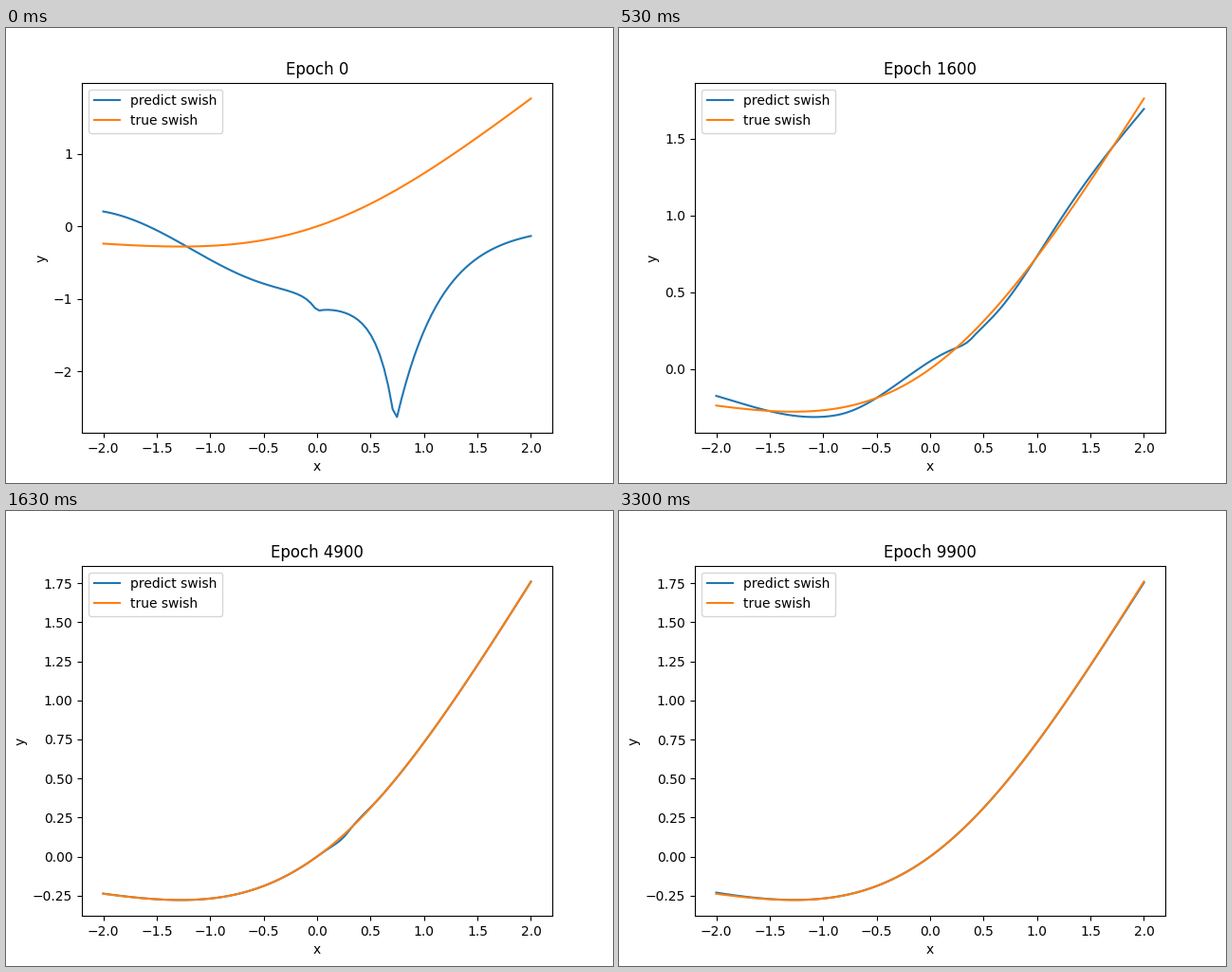
These frames come from a looping animation (640 px wide and 480 px high, 3.33 s). A matplotlib script:

```python
import numpy as np
import matplotlib.pyplot as plt
from matplotlib.animation import FuncAnimation

TICK_MS = 30
LOOP_MS = 3330
EPOCHS_PER_STEP = 100
WARMUP = 1000

# Crests of the error wave that is left after the warm-up.
CREST_X = np.array([-2.5, -.9, -.06, .58, 1.35, 2.6])
CREST_Y = np.array([.22, -.103, .122, -.1, .088, -.38])

x = np.linspace(-2, 2, 100)
true = x / (1 + np.exp(-x))


def cosine_path(v, px, py):
    """Join the points (px, py) with half cosine waves."""
    i = np.clip(np.searchsorted(px, v) - 1, 0, len(px) - 2)
    s = np.clip((v - px[i]) / (px[i + 1] - px[i]), 0, 1)
    return py[i] + (py[i + 1] - py[i]) * (1 - np.cos(np.pi * s)) / 2


def untrained(kink):
    """Starting curve: a slope, a corner at 0 and a sharp dip at kink."""
    gap = np.abs(x - kink)
    slope = cosine_path(x, np.array([-2.2, -.15]), np.array([.23, -.86]))
    left = slope - .31 * np.exp(-np.abs(x) / .13)
    middle = -1.1 - 1.64 * np.exp(-gap / (.22 * kink)) - .05 * np.exp(-np.abs(x) / .1)
    right = -2.74 * np.exp(-gap / .42)
    return np.select([x < 0, x < kink], [left, middle], right)


def trained(epoch, kink):
    """True curve plus a fading wave, a ripple at the kink and a late drift."""
    progress = epoch / 10000
    fade = np.exp(-max(epoch - WARMUP, 0) / 700)
    wave = fade * cosine_path(x, CREST_X, CREST_Y)
    d = (x - kink) / .1
    ripple = np.where(d < 0, 1, .4) * d * np.exp(.5 - d * d / 2)
    ripple *= .033 * (1 - progress) * (1 - fade)
    drift = -.008 * progress ** 4 * (x / 2) ** 5
    return true + wave + ripple + drift


def predict(epoch):
    kink = .48 - .032 * epoch / 1000 + .25 * np.exp(-epoch / 300)
    s = min(epoch / WARMUP, 1)
    w = (np.exp(-4 * s) - np.exp(-4)) / (1 - np.exp(-4))
    return w * untrained(kink) + (1 - w) * trained(epoch, kink)


fig, ax = plt.subplots(figsize=(6.4, 4.8), dpi=100)
predicted, = ax.plot(x, predict(0), label="predict swish")
ax.plot(x, true, label="true swish")
ax.set_xlabel("x")
ax.set_ylabel("y")
title = ax.set_title("Epoch 0")
ax.legend(loc="upper left")


def update(frame):
    # 111 ticks show 100 steps, each starting on a whole 10 ms.
    epoch = (9 * frame + 7) // 10 * EPOCHS_PER_STEP
    predicted.set_ydata(predict(epoch))
    title.set_text(f"Epoch {epoch}")
    ax.relim()
    ax.autoscale_view()
    return predicted, title


anim = FuncAnimation(fig, update, frames=LOOP_MS // TICK_MS, interval=TICK_MS,
                     repeat=True, repeat_delay=0, blit=False)
plt.show()
```
